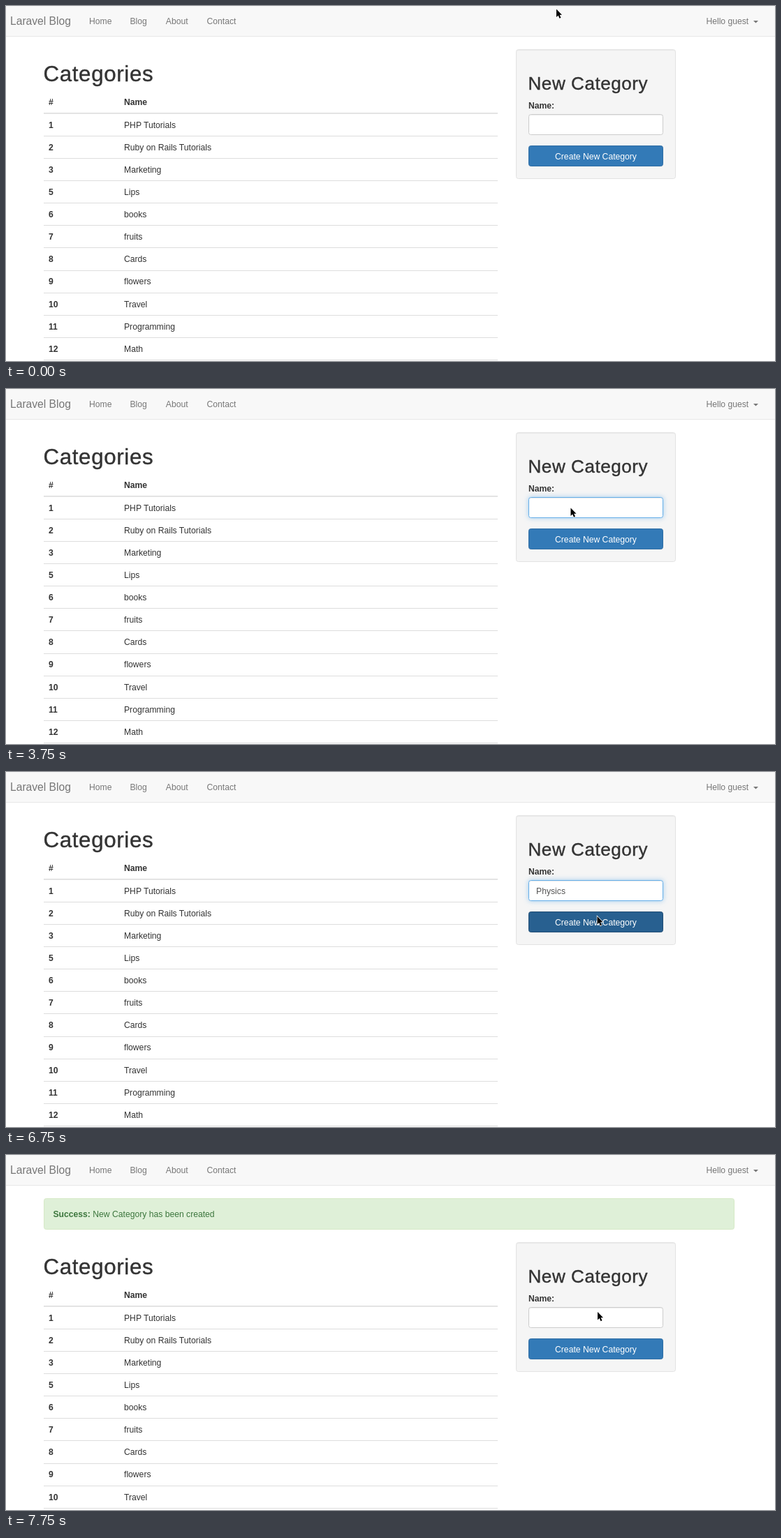
Write an HTML page that moves like this. It is 1101 by 509 pixels and loops after 8000 ms.

```html
<!DOCTYPE html>
<html lang="en">
<head>
<meta charset="utf-8">
<title>Categories</title>
<style>
  html, body { margin: 0; width: 100%; height: 100%; overflow: hidden; background: #fff; }
  #stage { position: relative; width: 1101px; height: 509px; overflow: hidden; }
  #stage div, svg { position: absolute; box-sizing: border-box; }
  svg { left: 0; top: 0; width: 1101px; height: 509px; overflow: hidden; }
  text { font: 12.16px "Liberation Sans", Arial, sans-serif; fill: #333; white-space: pre; }
  .b { font-weight: bold; }
  .nav { fill: #777; }
  .brand { font-size: 15.64px; }
  .h1, .h2 { letter-spacing: .021em; stroke: #333; stroke-width: .4px; }
  .h1 { font-size: 31.27px; }
  .h2 { font-size: 26.06px; }
  .light { fill: #fff; text-anchor: middle; }
  .typed { fill: #555; }
  .ok { fill: #3c763d; }

  #nav { left: 0; top: 0; width: 1101px; height: 44px; background: #f8f8f8; border-bottom: 1px solid #e7e7e7; }
  #alert { left: 54px; top: 62px; width: 989px; height: 45px; background: #dff0d8; border: 1px solid #d6e9c6; border-radius: 3.5px; }
  #page { left: 0; top: 0; width: 1101px; height: 509px; }
  #well { left: 730px; top: 62px; width: 229px; height: 186px; background: #f5f5f5; border: 1px solid #e3e3e3;
    border-radius: 3.5px; box-shadow: inset 0 1px 1px rgba(0,0,0,.05); }
  #field { left: 748px; top: 155px; width: 193px; height: 30px; background: #fff; border: 1px solid #ccc;
    border-radius: 3.5px; box-shadow: inset 0 1px 1px rgba(0,0,0,.075); }
  #button { left: 748px; top: 200px; width: 193px; height: 30px; background: #337ab7; border: 1px solid #2e6da4; border-radius: 3.5px; }
  #hint { left: 748px; top: 185px; width: 193px; height: 23px; background: #fff; border: 1px solid #c4c4c4; }

  .focus #field { border-color: #66afe9; box-shadow: inset 0 1px 1px rgba(0,0,0,.075), 0 0 7px rgba(102,175,233,.6); }
  .fade #field { border-color: #a2bfd8; }
  .hover #button { background: #286090; border-color: #204d74; }
  .press #button { box-shadow: 0 0 2px 1.5px #3b99fc; }
  #alert, #alertText, #hint, #hintText { visibility: hidden; }
  .done #alert, .done #alertText, .hint #hint, .hint #hintText { visibility: visible; }
  .done #page { top: 63px; }
</style>
</head>
<body>
<div id="stage">
  <div id="nav"></div>
  <div id="alert"></div>
  <div id="page">
    <div id="well"></div>
    <div id="field"></div>
    <div id="button"></div>
    <svg id="body">
      <rect x="54" y="153" width="650" height="1.6" fill="#ddd"/>
      <text class="h1" x="53.5" y="108">Categories</text>
      <text class="b" x="60.9" y="142">#</text>
      <text class="b" x="169" y="142">Name</text>
      <g id="rows"></g>
      <text class="h2" x="747.5" y="120.3">New Category</text>
      <text class="b" x="748" y="147">Name:</text>
      <text class="light" x="844.5" y="220">Create New Category</text>
      <text class="typed" id="typed" x="759.1" y="174.6"></text>
      <rect id="caret" y="163" width="1" height="14" fill="#444"/>
    </svg>
    <div id="hint"></div>
    <svg><text id="hintText" x="759.1" y="201">Programming</text></svg>
  </div>
  <svg>
    <text class="nav brand" x="6" y="27">Laravel Blog</text>
    <text class="nav" x="119" y="26">Home</text>
    <text class="nav" x="177.4" y="26">Blog</text>
    <text class="nav" x="228.8" y="26">About</text>
    <text class="nav" x="287.5" y="26">Contact</text>
    <text class="nav" x="1002.4" y="26">Hello guest</text>
    <path d="M1070 21h7l-3.5 3.5z" fill="#777"/>
    <text class="ok" id="alertText" x="67.5" y="88.6"><tspan class="b">Success:</tspan> New Category has been created</text>
    <path id="cursor" d="M0 0V11.4L2.6 9 4.5 13.2 6.5 12.3 4.6 8.2H8Z" fill="#000" stroke="#fff" stroke-width="1.4" paint-order="stroke"/>
  </svg>
</div>
<script>
const $ = id => document.getElementById(id);
const LOOP = 8000, ROW = 32.14;

const names = ["PHP Tutorials", "Ruby on Rails Tutorials", "Marketing", "Lips", "books", "fruits",
  "Cards", "flowers", "Travel", "Programming", "Math"];
$("rows").innerHTML = names.map((name, i) => {
  const id = i < 3 ? i + 1 : i + 2;   // category 4 was deleted
  const y = 174.5 + ROW * i;
  const line = Math.floor(186.2 + ROW * i);
  return `<text class="b" x="60.9" y="${y}">${id}</text><text x="169" y="${y}">${name}</text>` +
    `<rect x="54" y="${line}" width="650" height="1" fill="#ddd"/>`;
}).join("");

// Each track lists [start time, value]; a value holds until the next one.
const pointer = [
  [0, [788, 4.5]], [1000, [781.5, 50]], [1250, [785.5, 103]], [1500, [808.5, 167.5]], [2000, [808.5, 170.5]],
  [6500, [827, 183]], [6750, [846.5, 207]], [7000, [848, 213]], [7750, [847, 225]]
];
const typing = [[0, 0], [4000, 1], [4500, 2], [4750, 3], [5500, 5], [5750, 6], [6250, 7], [7750, 0]];
const caret = [[0, 0], [2250, 1], [2750, 0], [3250, 1], [3750, 0], [4000, 1], [5250, 0], [5500, 1], [6750, 0]];
const mode = [
  [0, ""], [2250, "focus"], [4000, "focus hint"], [4500, "focus"], [6750, "focus hover"],
  [7000, "fade hover press"], [7250, "hover press"], [7750, "done"]
];
const at = (track, t) => track.filter(step => step[0] <= t).pop()[1];

function draw(t) {
  const [x, y] = at(pointer, t);
  $("cursor").setAttribute("transform", `translate(${x} ${y})`);
  $("stage").className = at(mode, t);
  const typed = $("typed"), count = at(typing, t);
  typed.textContent = "Physics".slice(0, count);
  const width = count ? typed.getComputedTextLength() : 0;
  $("caret").setAttribute("x", Math.round(759.1 + width));
  $("caret").style.visibility = at(caret, t) ? "visible" : "hidden";
}

const start = performance.now();
function tick() {
  draw((performance.now() - start) % LOOP);
  requestAnimationFrame(tick);
}
tick();
</script>
</body>
</html>
```
